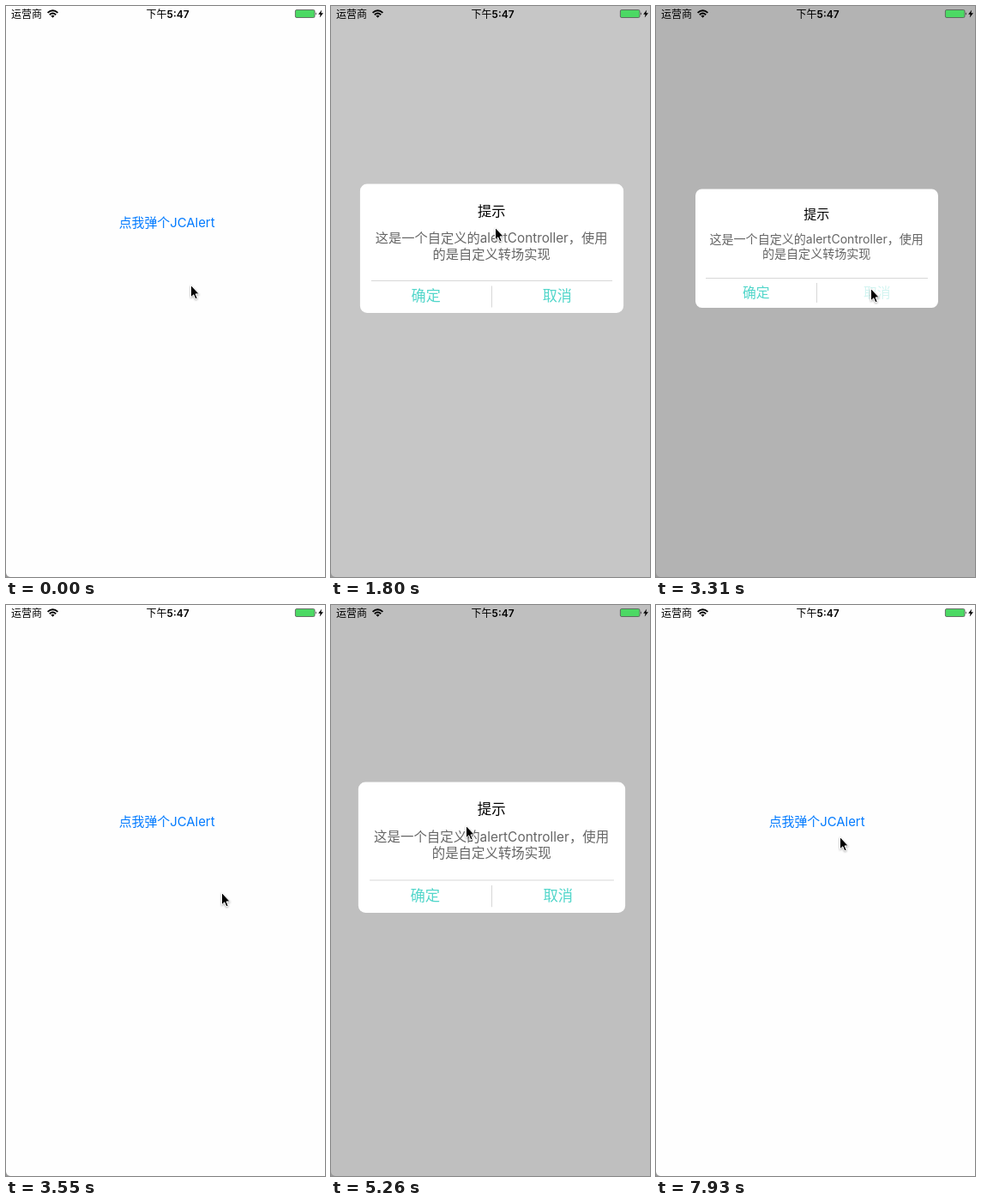
Recreate the animation shown at these times as an HTML page. Size 372 px wide and 666 px high, loop 7990 ms.

```html
<!DOCTYPE html>
<html lang="zh-CN">
<head>
<meta charset="utf-8">
<title>Alert</title>
<style>
html, body { margin: 0; width: 100%; height: 100%; overflow: hidden; background: #fefefe; }
svg { display: block; font-family: Inter, "Noto Sans CJK SC", "Noto Sans CJK", sans-serif; }
.mid { text-anchor: middle; }
#cursor { filter: drop-shadow(0 1px 1px #0005); }
</style>
</head>
<body>
<svg width="372" height="666" viewBox="0 0 372 666">
  <rect width="372" height="666" fill="#fefefe"/>
  <text id="open" class="mid" x="187.6" y="257.8" font-size="14.9" fill="#007aff">点我弹个JCAlert</text>
  <rect id="shade" width="372" height="666"/>

  <g id="status">
    <text x="6" y="13.6" font-size="12">运营商</text>
    <g fill="none" stroke="#000" stroke-width="1.9">
      <path d="M48.6 7.9Q54.5 2.6 60.4 7.9M50.8 10.2Q54.5 7 58.2 10.2"/>
    </g>
    <path d="M52.4 11.6Q54.5 9.9 56.6 11.6L54.5 13.8Z"/>
    <text class="mid" x="188.6" y="13.6" font-size="12" font-weight="600"><tspan font-weight="500">下午</tspan>5:47</text>
    <rect x="337.4" y="4.5" width="22.6" height="9" rx="1.5" fill="#4cd964" stroke="#555" stroke-width=".8"/>
    <path d="M361 7.2q1.6 1.8 0 3.6zM368.2 4.5L364.2 9.8H366.6L365.8 13.5L370 8.2H367.4Z"/>
  </g>

  <g id="dialog">
    <rect x="46" y="213.5" width="283" height="138.5" rx="7.5" fill="#fff"/>
    <g class="mid">
      <text x="187.3" y="247.8" font-size="15" font-weight="500">提示</text>
      <g font-size="14.05" fill="#666">
        <text x="187.2" y="276.9">这是一个自定义的alertController，使用</text>
        <text x="187.2" y="293.6">的是自定义转场实现</text>
      </g>
      <g font-size="15.8" fill="#52d6ca">
        <text x="116.8" y="339.6">确定</text>
        <text id="cancel" x="257.8" y="339.6">取消</text>
      </g>
    </g>
    <path d="M58 317.5H317M187.5 323V346" stroke="#d8d8d8"/>
  </g>

  <path d="M0 661Q.5 665.5 5 666H0Z" fill="#999"/>
  <path id="cursor" d="M.5 .5V14.8L3.8 11.8L5.9 16.8L8.2 15.8L6.1 10.9H10.3Z" stroke="#fff"/>
</svg>
<script>
const LOOP = 7990;
const alerts = [[1680, 3490], [5100, 7190]];
// cursor stops: time, x, y
const path = [
  [0, 215, 325], [800, 190, 306], [1450, 191, 258], [1800, 191, 258],
  [2430, 242, 301], [3190, 250, 329], [3440, 250, 329], [3550, 251, 335],
  [4230, 182, 266], [4860, 157, 257], [5260, 157, 257],
  [5840, 153, 318], [6300, 100, 336], [7190, 100, 336], [7930, 214, 270], [LOOP, 214, 270]
];
const el = id => document.getElementById(id);
const [open, shade, dialog, cancel, cursor] = ['open', 'shade', 'dialog', 'cancel', 'cursor'].map(el);
const ease = p => p * p * (3 - 2 * p);
const within = (t, a, b) => t >= a && t < b;
const dim = (node, on) => node.setAttribute('opacity', on ? 0.25 : 1);

function cursorAt(t) {
  const i = path.findIndex(stop => stop[0] > t);
  const [t0, x0, y0] = path[i - 1], [t1, x1, y1] = path[i];
  const p = ease((t - t0) / (t1 - t0));
  return [x0 + (x1 - x0) * p, y0 + (y1 - y0) * p];
}

// grow past full size, then settle
function popScale(age) {
  if (age < 170) return 1.1 - 0.6 * (1 - age / 170) ** 3;
  return 1.1 - 0.1 * ease(Math.min(1, (age - 170) / 180));
}

function draw(now) {
  const t = now % LOOP;
  const shown = alerts.find(([a, b]) => within(t, a, b));
  const age = shown ? t - shown[0] : 0;
  shade.setAttribute('opacity', 0.3 * (1 - Math.exp(-age / 93)));
  dialog.setAttribute('opacity', Math.min(1, age / 60));
  dialog.setAttribute('transform',
    `translate(187.5 282.75) scale(${popScale(age)}) translate(-187.5 -282.75)`);
  dim(open, within(t, 1500, 1680) || within(t, 4920, 5100));
  dim(cancel, within(t, 3310, 3490));
  cursor.setAttribute('transform', `translate(${cursorAt(t)})`);
}

const start = performance.now();
function tick() {
  draw(performance.now() - start);
  requestAnimationFrame(tick);
}
tick();
</script>
</body>
</html>
```
